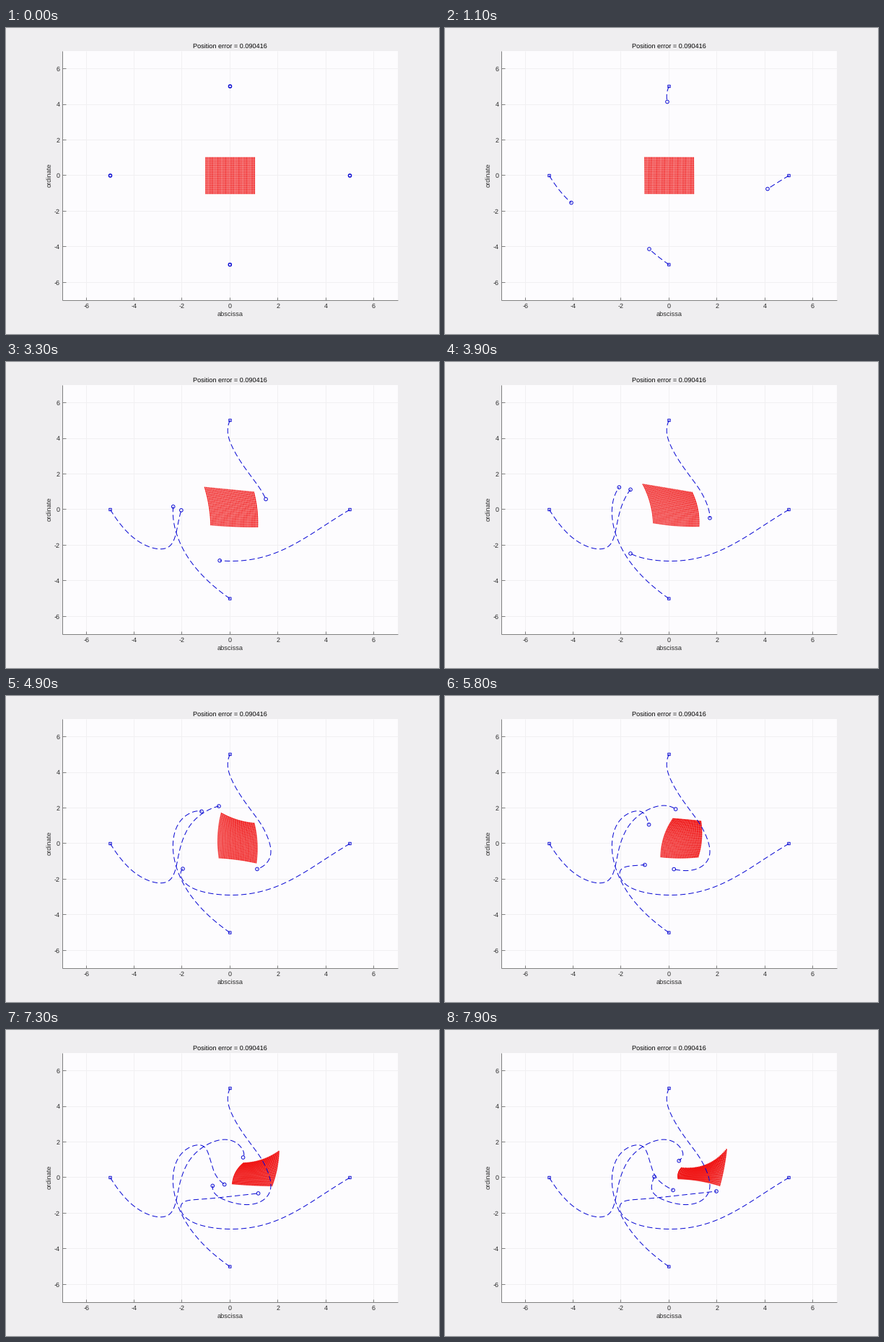
These frames come from a looping animation (600x425 px, 8 s). A matplotlib script:

```python
import numpy as np
import matplotlib.pyplot as plt
from matplotlib.animation import FuncAnimation
from matplotlib.patches import Rectangle

W, H, DPI = 600, 425, 100
PX = 72 / DPI                      # one pixel in points
X0, Y0, SX, SY = 310.3, 204.9, 33.18, 24.72
LEFT, RIGHT, TOP, BOTTOM = 78.5, 543, 32, 378.5
BLUE, RED, GRAY = "#0808d4", "#f01212", "#808080"
N = 31                             # dots along each side of the patch

# Pixel positions of the north, west, east and south agent at key steps
waypoints = {
    0: [(310.5, 81), (144.5, 205), (476.5, 205), (310.3, 328.7)],
    8: [(308, 102.5), (175, 242.7), (447, 223.5), (283, 307)],
    16: [(331, 147), (225, 257), (380, 262.5), (246.5, 262)],
    23: [(354.5, 180), (239.5, 219), (315, 276.5), (231.5, 214)],
    30: [(367, 216.7), (257, 177.2), (257, 266), (241.3, 174)],
    38: [(348, 240.4), (295, 153), (245, 240), (271, 160.3)],
    44: [(322, 241.5), (317, 155.5), (271, 235), (281.5, 175)],
    51: [(292.7, 230.3), (329, 168.7), (315, 230.7), (290, 200.3)],
    62: [(290, 203.8), (324.2, 181.7), (376, 224), (316, 222.4)],
}

# Patch corners clockwise from the top left, then how far each side bulges out
poses = {
    0: [277.2, 180.2, 344.2, 180.2, 344.2, 229.8, 277.2, 229.8, 0, 0, 0, 0],
    30: [274.5, 170, 342.2, 181.3, 351.5, 228, 289, 223.2, 0, 3, 1.5, -3],
    38: [298.5, 163, 343.7, 177, 346.5, 231.5, 295.5, 224.5, -2.5, 2.5, -1, 3],
    51: [331, 177, 363.5, 171.8, 354, 216.5, 302.5, 222, 2.5, 3, 3.5, 5],
    62: [328, 191.5, 390, 166, 380.5, 216, 323.5, 206.5, -9, 1, -2, 2],
}


def spline(t, p):
    """Cubic spline through p at times t, starting from rest."""
    h, n = np.diff(t), len(t)
    dp = np.diff(p, axis=0) / h[:, None]
    A, b = np.eye(n), np.zeros_like(p)
    for i in range(1, n - 1):
        a, c = 1 / h[i - 1], 1 / h[i]
        A[i, i - 1:i + 2] = a, 2 * (a + c), c
        b[i] = 3 * (a * dp[i - 1] + c * dp[i])
    A[-1, -2:] = 1, 2
    b[-1] = 3 * dp[-1]
    m = np.linalg.solve(A, b)

    def at(s):
        k = np.clip(np.searchsorted(t, s, side="right") - 1, 0, n - 2)
        g = h[k][:, None]
        u = (s - t[k])[:, None] / g
        return ((1 + 2 * u) * (1 - u) ** 2 * p[k] + u * (1 - u) ** 2 * g * m[k]
                + u * u * (3 - 2 * u) * p[k + 1] + u * u * (u - 1) * g * m[k + 1])
    return at


path = spline(np.array(list(waypoints), float),
              np.array(list(waypoints.values()), float).reshape(-1, 8))


def tracks(step):
    """Paths of all agents up to a step, as (agent, sample, xy)."""
    past = np.linspace(0, step, 10 * step + 2)
    return path(past).reshape(-1, 4, 2).swapaxes(0, 1)


pose_steps = list(poses)
pose_table = np.array(list(poses.values()), float).T
side = np.linspace(0, 1, N)
u, v = side[None, :, None], side[:, None, None]


def edge(a, b, bulge):
    d = b - a
    normal = np.array([d[1], -d[0]]) / np.hypot(*d)
    t = side[:, None]
    return a + t * d + 4 * t * (1 - t) * bulge * normal


def patch_dots(step):
    """Fill the bent four-sided patch with an N by N net of dots."""
    s = step if step > 30 else 30 * (step / 30) ** 3
    pose = np.array([np.interp(s, pose_steps, row) for row in pose_table])
    p, bulge = pose[:8].reshape(4, 2), pose[8:]
    top, right, bottom, left = [edge(p[i], p[(i + 1) % 4], bulge[i]) for i in range(4)]
    bottom, left = bottom[::-1], left[::-1]
    corners = ((1 - u) * (1 - v) * p[0] + u * (1 - v) * p[1]
               + u * v * p[2] + (1 - u) * v * p[3])
    net = ((1 - v) * top[None] + v * bottom[None]
           + (1 - u) * left[:, None] + u * right[:, None] - corners)
    return net.reshape(-1, 2)


def step_at(frame):
    """Four steps, one per frame, then a rest of one frame."""
    group, part = divmod(frame - 3, 5)
    return max(0, 4 * group + min(part, 3) + 1)


plt.rcParams["font.family"] = "Liberation Sans"
plt.rcParams["text.hinting"] = "no_hinting"
fig = plt.figure(figsize=(W / DPI, H / DPI), dpi=DPI, facecolor="#efeef0")
ax = fig.add_axes([0, 0, 1, 1])
ax.set(xlim=(0, W), ylim=(H, 0))
ax.axis("off")


def rule(x, y, color, z):
    # half a pixel less, so that snapping lands on the wanted pixel
    ax.plot(np.subtract(x, 0.5), np.subtract(y, 0.5), color=color, lw=PX,
            zorder=z, solid_capstyle="butt")


def label(x, y, text, size, color="#2b2b2b", **kw):
    ax.text(x, y, text, fontsize=size * PX, color=color,
            **{"ha": "center", "va": "baseline", **kw})


ax.add_patch(Rectangle((LEFT, TOP), RIGHT - LEFT, BOTTOM - TOP,
                       fc="#fdfcfe", ec="none", zorder=0))
for n in range(-6, 7, 2):
    x, y = X0 + SX * n, Y0 - SY * n
    rule([x, x], [TOP, BOTTOM], "#f1f0f2", 1)
    rule([LEFT, RIGHT], [y, y], "#f1f0f2", 1)
    rule([x, x], [BOTTOM - 4.5, BOTTOM], GRAY, 2)
    rule([LEFT, LEFT + 4.5], [y, y], GRAY, 2)
    label(x, 389, str(n), 9)
    label(75, y + 3.2, str(n), 9, ha="right")
rule([LEFT, LEFT], [TOP, BOTTOM], GRAY, 2)
rule([LEFT, RIGHT], [BOTTOM, BOTTOM], GRAY, 2)
label(310.3, 28.4, "Position error = 0.090416", 9.2, "black")
label(310.3, 400.4, "abscissa", 9.25)
label(64, 204.5, "ordinate", 9.25, rotation=90, ha="right", va="center")


def marks(points, size, shape="o", z=6, **kw):
    area = np.full(len(points), (size * PX) ** 2)
    return ax.scatter(*np.transpose(points), s=area, marker=shape, zorder=z,
                      snap=False, **kw)


hollow = dict(facecolors="none", edgecolors=BLUE, linewidths=PX * 0.95)
starts = tracks(0)[:, -1]
dots = marks(patch_dots(0), 1.85, z=3, color=RED, linewidths=0)
trails = [ax.plot([], [], color=BLUE, lw=PX, ls=(0, (7.5, 4)),
                  dash_capstyle="butt", zorder=5)[0] for _ in starts]
marks(starts, 3.4, "s", **hollow)
heads = marks(starts, 4.6, **hollow)


def draw(frame):
    step = step_at(frame)
    lines = tracks(step)
    for trail, line in zip(trails, lines):
        trail.set_data(*line.T)
    heads.set_offsets(lines[:, -1])
    dots.set_offsets(patch_dots(step))
    return [dots, heads, *trails]


anim = FuncAnimation(fig, draw, frames=80, interval=100, repeat=True,
                     repeat_delay=0, blit=False)
plt.show()
```
